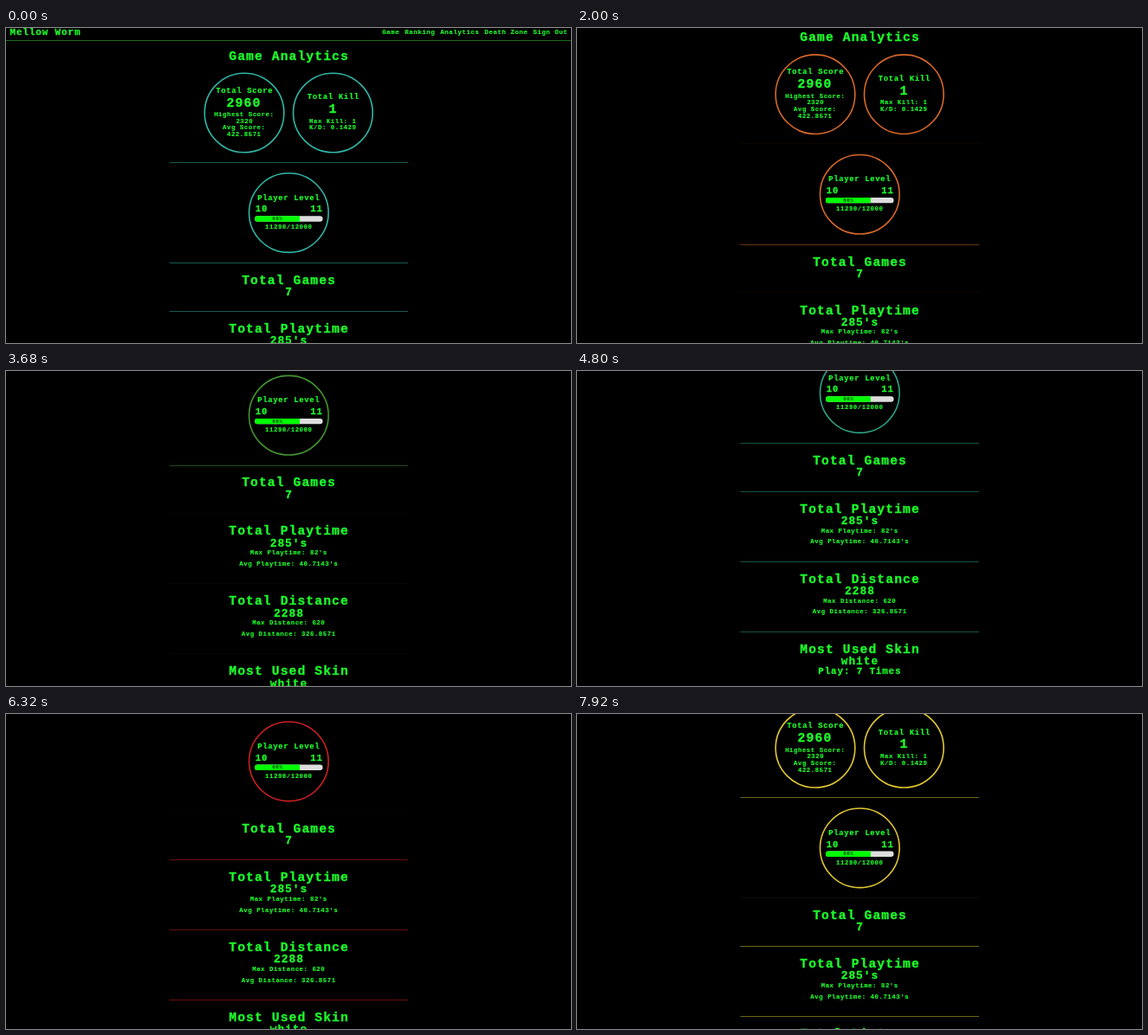
Animation, 652 px wide and 364 px high, one loop 8000 ms. Source, as an HTML page:

```html
<!DOCTYPE html>
<html lang="en">
<head>
<meta charset="utf-8">
<title>Game Analytics</title>
<style>
  html, body { margin: 0; width: 100%; height: 100%; overflow: hidden; background: #000; }
  svg { display: block; width: 652px; height: 364px; }
  text {
    font-family: "Liberation Mono", "DejaVu Sans Mono", monospace; font-weight: bold;
    fill: #1dfb2b; stroke: #1dfb2b; stroke-width: .025em; white-space: pre;
  }
  .dark { fill: #063a06; stroke: none; }
  circle { fill: none; stroke-width: 1.6; }
</style>
</head>
<body>
<svg viewBox="0 0 652 364">
  <g id="rules"></g>
  <g id="page">
    <rect y="14" width="652" height="1" fill="#1c6a1c"/>
    <rect x="287" y="217.3" width="78.5" height="6.4" rx="3.2" fill="#ddd"/>
    <path d="M339 217.3H290.2a3.2 3.2 0 0 0 0 6.4H339z" fill="#0f0"/>
  </g>
</svg>
<script>
const LOOP = 8000, CYCLE = 5000;
const page = document.getElementById('page'), rules = document.getElementById('rules');

function add(parent, tag, attrs, text = '') {
  const el = document.createElementNS('http://www.w3.org/2000/svg', tag);
  for (const k in attrs) el.setAttribute(k, attrs[k]);
  el.textContent = text;
  return parent.appendChild(el);
}

// Monospaced line centred on (x, y); pitch is the distance between letters
function label(text, x, y, pitch, cls = '') {
  const size = pitch * 1.47, gap = pitch - size * 0.6;
  add(page, 'text', {
    x: x - text.length * pitch / 2 + gap / 2, y: y + pitch * 0.46,
    'font-size': size, 'letter-spacing': gap, class: cls
  }, text);
}

const MID = 326;
label('Mellow Worm', 45, 5, 7.45);
label('Game', 444, 4.7, 5);
label('Ranking', 477.5, 4.7, 5);
label('Analytics', 523.5, 4.7, 5);
label('Death Zone', 577, 4.7, 5);
label('Sign Out', 628, 4.7, 5);

label('Game Analytics', MID, 32, 9.9);

label('Total Score', 275, 72, 6);
label('2960', 274, 86, 10);
label('Highest Score:', 274.5, 100, 4.95);
label('2320', 275, 107.5, 4.95);
label('Avg Score:', 274.5, 115, 4.95);
label('422.8571', 274.5, 123, 4.95);

label('Total Kill', 377.5, 79.5, 6);
label('1', 377, 93.5, 10);
label('Max Kill: 1', 377, 107.5, 4.95);
label('K/D: 0.1429', 377, 115, 4.95);

label('Player Level', MID, 196, 6);
label('10', 294.5, 209, 7.2);
label('11', 358, 209, 7.2);
label('66%', 313, 220.4, 4, 'dark');
label('11290/12000', MID, 230, 4.95);

label('Total Games', MID, 291.3, 9.9);
label('7', MID, 305, 8.7);

label('Total Playtime', MID, 347.3, 9.9);
label("285's", MID, 361, 8.7);
label("Max Playtime: 82's", MID, 372.5, 4.95);
label("Avg Playtime: 40.7143's", MID, 385, 4.95);

label('Total Distance', MID, 428.2, 9.9);
label('2288', MID, 442, 8.7);
label('Max Distance: 620', MID, 453.5, 4.95);
label('Avg Distance: 326.8571', MID, 466, 4.95);

label('Most Used Skin', MID, 509.2, 9.9);
label('white', MID, 523, 8.7);
label('Play: 7 Times', MID, 535, 7.4);

const rings = [[275, 98], [377.3, 98], [326.3, 213.6]]
  .map(([cx, cy]) => add(page, 'circle', { cx, cy, r: 45.8 }));
const lines = [155.1, 271.45, 327.1, 408.1, 489.1]
  .map(y => ({ y, el: add(rules, 'rect', { x: 188.5, width: 275.5, height: 1 }) }));

const SCROLL = [
  [0, 0], [1600, 0], [1760, 8], [2800, 65.55], [2960, 65.55], [3520, 162.4], [4400, 162.4],
  [4700, 188], [5400, 188], [6320, 158.8], [7920, 58.8], [8000, 54]
];
const TEAL = [48, 182, 166], RED = [205, 30, 34], GOLD = [228, 200, 50], GREEN = [66, 148, 48];
const COLOR = [[0, TEAL], [1300, RED], [2900, GOLD], [3680, GREEN], [4800, [45, 165, 136]], [CYCLE, TEAL]];

// Linear interpolation between [time, value] keys
function sample(keys, t) {
  let i = 1;
  while (i < keys.length - 1 && t > keys[i][0]) i++;
  const [t0, a] = keys[i - 1], [t1, b] = keys[i], p = (t - t0) / (t1 - t0);
  const mix = (u, v) => u + (v - u) * p;
  return Array.isArray(a) ? a.map((u, n) => mix(u, b[n])) : mix(a, b);
}

function draw(now) {
  const t = now % LOOP, scroll = sample(SCROLL, t);
  const color = `rgb(${sample(COLOR, t % CYCLE).map(Math.round)})`;
  page.setAttribute('transform', `translate(0 ${-scroll})`);
  for (const ring of rings) ring.setAttribute('stroke', color);
  for (const { y, el } of lines) {
    // Hairlines fade out when they fall between pixel rows
    const pos = y - scroll, row = Math.floor(pos);
    el.setAttribute('y', row);
    el.setAttribute('fill', color);
    el.setAttribute('opacity', pos - row < 0.48 ? 0.5 : 0.06);
  }
}

const start = performance.now();
function tick() {
  draw(performance.now() - start);
  requestAnimationFrame(tick);
}
tick();
</script>
</body>
</html>
```
